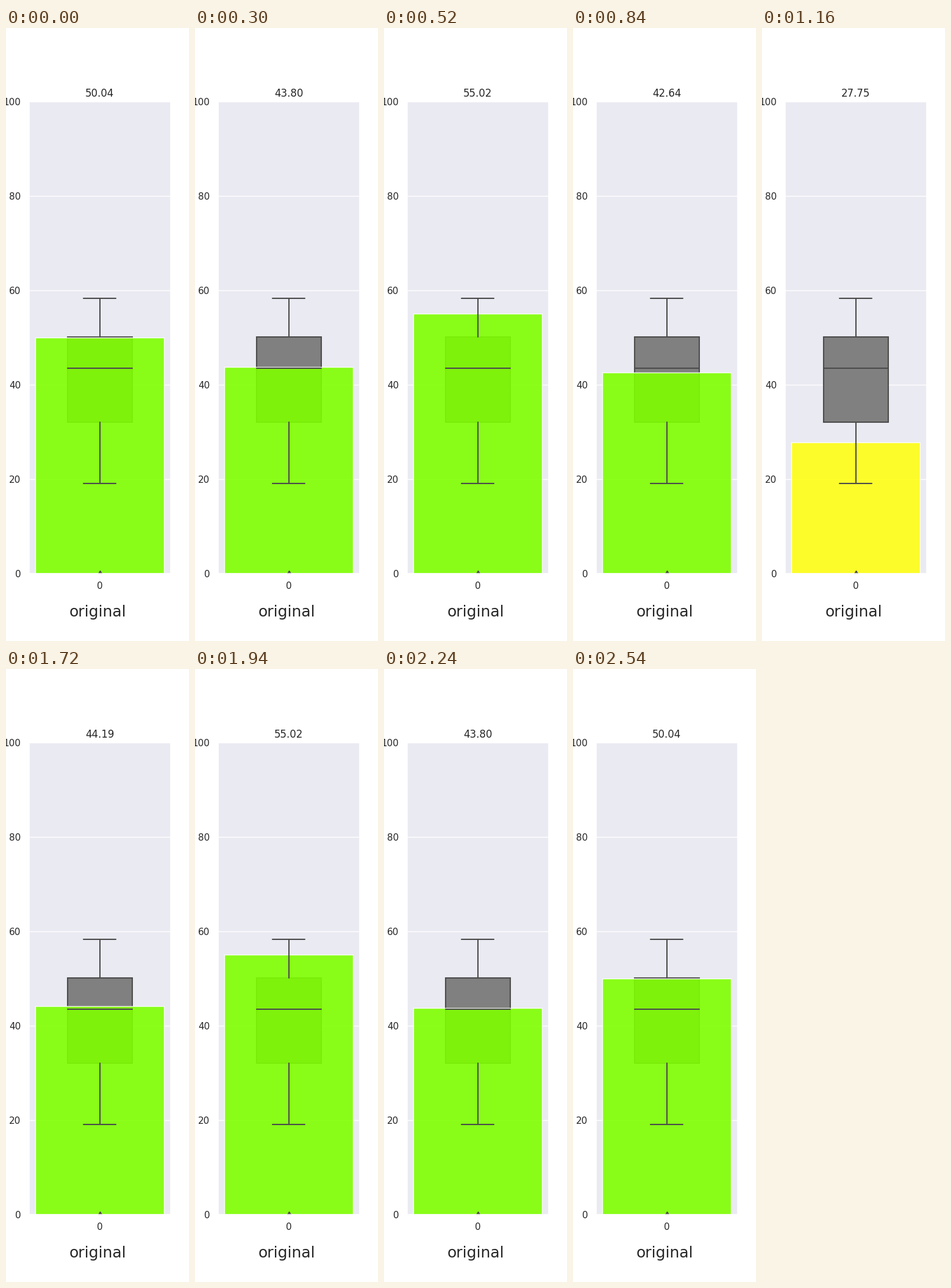
Animation of 300x1000 px, one loop 2.56 s. Source, as a matplotlib script:

```python
import numpy as np
import matplotlib.pyplot as plt
from matplotlib.animation import FuncAnimation

INK = "#262626"
LINE = "#4c4c4c"
LIME, YELLOW = "chartreuse", "xkcd:yellow"
STEPS = 128
INTERVAL = 20

# Turning points of the score curve: position in the series -> score
turns = {0: 50.04, 5: 38.0, 12: 58.3, 14: 55.02, 22: 42.64,
         25: 29.07, 27: 19.05, 30: 27.75, 31: 0}
stats = dict(whislo=19.05, q1=32.05, med=43.5, q3=50.13, whishi=58.3, fliers=[0])

plt.rcParams.update({
    "font.family": "DejaVu Sans",
    "text.color": INK,
    "axes.facecolor": "#EAEAF2",
    "axes.edgecolor": "white",
    "axes.linewidth": 1.25,
    "axes.axisbelow": True,
    "lines.solid_capstyle": "round",
})

fig, ax = plt.subplots(figsize=(3, 10), dpi=100, facecolor="white")
ax.grid(axis="y", color="white", linewidth=1)

line = dict(color=LINE, linewidth=1.5, solid_capstyle="round")
ax.bxp(
    [stats], positions=[0], widths=0.4, patch_artist=True, manage_ticks=False,
    boxprops=dict(facecolor="#808080", edgecolor=LINE, linewidth=1.5, zorder=1),
    whiskerprops=line, capprops=line, medianprops=line, capwidths=0.2,
    flierprops=dict(marker="d", markersize=5, markerfacecolor=LINE,
                    markeredgecolor=LINE),
)
bar = ax.bar(0, turns[0], width=0.8, alpha=0.9, edgecolor="white",
             linewidth=1, zorder=1.5)[0]

ax.set(xlim=(-0.44, 0.44), ylim=(0, 100), xticks=[0], yticks=range(0, 101, 20))
ax.set_xticklabels(["0"])
ax.tick_params(length=0, pad=9.5, labelsize=11, labelcolor=INK)
title = ax.set_title("", fontsize=12)
fig.text(0.5, 0.04, "original", fontsize=18, ha="center")


def score_index(step):
    """Play forwards then backwards, resting on every fourth score."""
    tick = min(step, STEPS - 1 - step)
    block, offset = divmod(tick - 2, 8)
    return 2 + 4 * block + max(0, offset - 4)


def update(step):
    score = np.interp(score_index(step), list(turns), list(turns.values()))
    bar.set_height(score)
    bar.set_facecolor(LIME if score > 35 else YELLOW)
    title.set_text(f"{score:.2f}")
    return bar, title


anim = FuncAnimation(fig, update, frames=STEPS, interval=INTERVAL,
                     repeat=True, repeat_delay=0)
plt.show()
```
